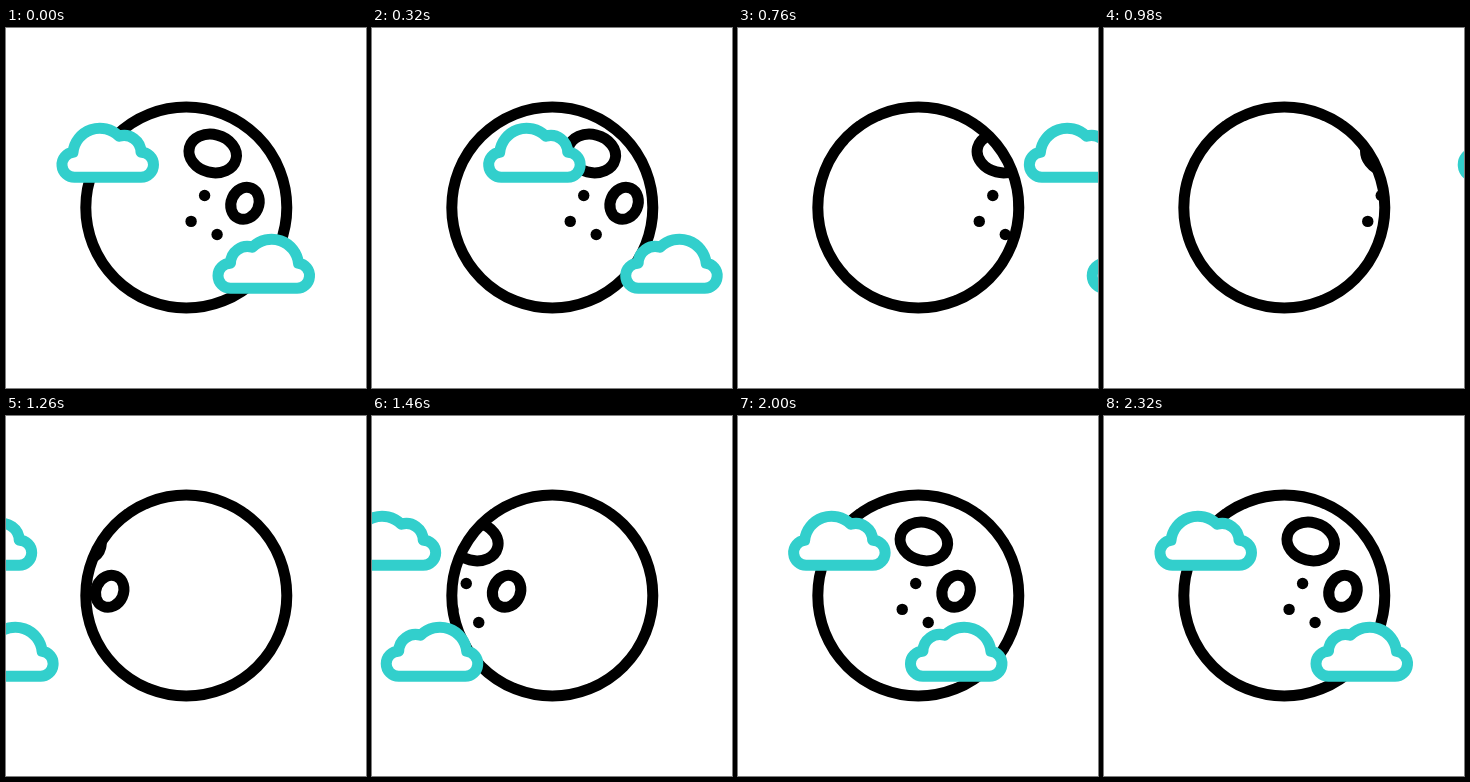
An HTML page for the animation above (2.4 s loop, 360x360 px).

```html
<!DOCTYPE html>
<html lang="en">
<head>
<meta charset="utf-8">
<title>Moon and clouds</title>
<style>
  html, body { margin: 0; width: 100%; height: 100%; overflow: hidden; background: #fff; }
  svg { display: block; width: 100vw; height: 100vh; }
  .line { fill: none; stroke: #000; stroke-width: 11; }
  .cloud { fill: #fff; stroke: #32cfcc; stroke-width: 11; stroke-linejoin: round; }
</style>
</head>
<body>
<svg viewBox="0 0 360 360">
  <defs>
    <clipPath id="disc"><circle cx="180.3" cy="179.5" r="104"/></clipPath>
    <g id="craters">
      <ellipse class="line" rx="24" ry="19" transform="translate(206.7 125.5) rotate(14)"/>
      <ellipse class="line" rx="13.8" ry="16.4" transform="translate(239 175.3) rotate(24)"/>
      <circle cx="198.6" cy="167.5" r="5.7"/>
      <circle cx="185.1" cy="193.4" r="5.7"/>
      <circle cx="211.1" cy="206.5" r="5.7"/>
    </g>
    <path id="puff" class="cloud" d="M69 149.2A12.5 12.5 0 0 1 67 124.3A27 27 0 0 1 113 108.2A17 17 0 0 1 135 124.2A12.5 12.5 0 0 1 135 149.2Z"/>
  </defs>
  <g clip-path="url(#disc)">
    <use id="leaving" href="#craters"/>
    <use id="arriving" href="#craters"/>
  </g>
  <circle class="line" cx="180.3" cy="179.5" r="100.5"/>
  <g id="upper"><use href="#puff"/></g>
  <g id="lower"><use href="#puff" transform="translate(359.5 111) scale(-1 1)"/></g>
</svg>
<script>
  const LOOP = 2400;
  const SWAP = 1060;   // both clouds are off stage here
  const BRAKE = 260;   // time taken to slow to rest

  // Smooth start and stop, from rest to a given distance
  function leave(t, duration, distance) {
    const u = Math.min(1, t / duration);
    return distance * u * u * (3 - 2 * u);
  }

  // Steady speed from the left, then an even slowdown to rest
  function arrive(t, speed, stop) {
    const left = Math.max(0, stop - t);
    return -speed * (left > BRAKE ? left - BRAKE / 2 : left * left / (2 * BRAKE));
  }

  const motion = {
    leaving: t => leave(t, 1440, 103.5),
    arriving: t => arrive(t, .1546, 2266),
    upper: t => t < SWAP ? leave(t, 1160, 324) : arrive(t, .19, 2032),
    lower: t => t < SWAP ? leave(t, 960, 160) : arrive(t, .293, 2266)
  };

  const start = performance.now();

  function draw() {
    const t = Math.max(0, performance.now() - start) % LOOP;
    for (const id in motion)
      document.getElementById(id).setAttribute("transform", `translate(${motion[id](t).toFixed(2)} 0)`);
    requestAnimationFrame(draw);
  }
  draw();
</script>
</body>
</html>
```
